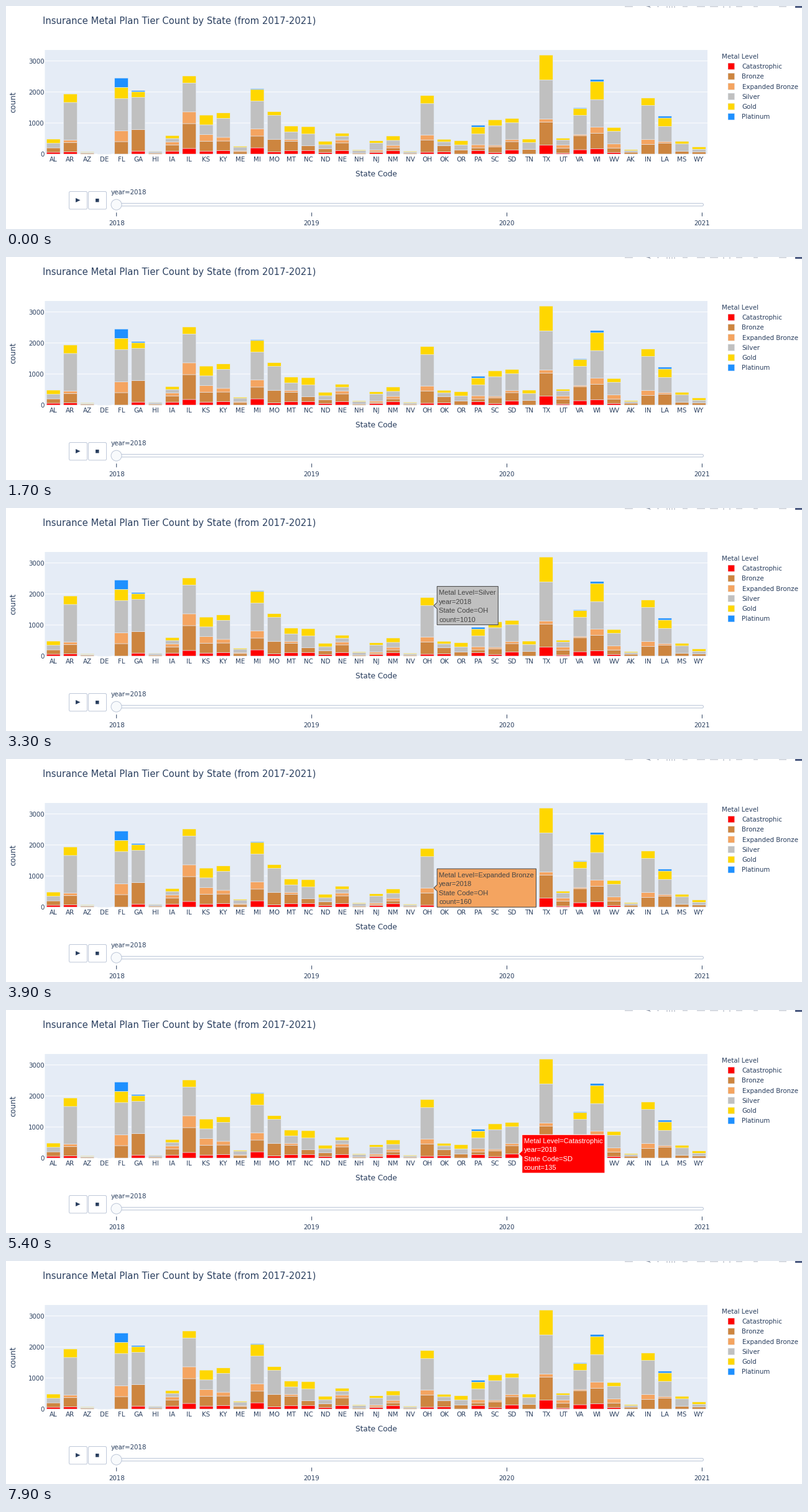
Recreate the animation shown at these times as a matplotlib script. Size 1280 by 360 pixels, loop 8000 ms.

```python
import matplotlib.pyplot as plt
from matplotlib.animation import FuncAnimation
from matplotlib.patches import Circle, FancyBboxPatch, Polygon, Rectangle

W, H, DPI = 1280, 360, 100
INK, PLOT_BG, CONTROL, SLIVER = "#2a3f5f", "#e5ecf6", "#bec8d9", "#d3d7de"
PX = 72 / DPI  # points per pixel

STATES = ("AL AR AZ DE FL GA HI IA IL KS KY ME MI MO MT NC ND NE NH NJ NM NV OH "
          "OK OR PA SC SD TN TX UT VA WI WV AK IN LA MS WY").split()
COLORS = {
    "Catastrophic": "#ff0000",
    "Bronze": "#cd853f",
    "Expanded Bronze": "#f4a460",
    "Silver": "#c0c0c0",
    "Gold": "#ffd700",
    "Platinum": "#1e90ff",
}
LEFT, RIGHT, TOP, BASE = 62.5, 1128, 71, 239
STEP = (RIGHT - LEFT) / len(STATES)

plt.rcParams["path.snap"] = False  # keep soft sub-pixel edges
fig = plt.figure(figsize=(W / DPI, H / DPI), dpi=DPI, facecolor="white")
ax = fig.add_axes([0, 0, 1, 1])
ax.set_xlim(0, W)
ax.set_ylim(H, 0)
ax.axis("off")


def label(x, y, s, size=10.2, ha="left", color=INK, font="DejaVu Sans", **kw):
    """Text whose capitals are centred vertically on y."""
    return ax.text(x, y + 0.365 * size, s, fontsize=size * PX, ha=ha,
                   va="baseline", color=color, family=font, **kw)


def rect(x0, y0, x1, y1, color, edge="none", lw=0.0):
    ax.add_patch(Rectangle((x0, y0), x1 - x0, y1 - y0, facecolor=color,
                           edgecolor=edge, linewidth=lw * PX))


def rounded(x0, y0, x1, y1, radius, color):
    ax.add_patch(FancyBboxPatch(
        (x0, y0), x1 - x0, y1 - y0, facecolor=color, edgecolor=CONTROL,
        boxstyle=f"round,pad=0,rounding_size={radius}", linewidth=PX))


def state_x(state):
    return LEFT + (STATES.index(state) + 0.5) * STEP


def count_y(value):
    return BASE - value * 0.0501


totals = dict.fromkeys(STATES, 0)
spans = {}


def stack(tier, **tops):
    """Add one tier on top of the bars, up to its running total per state."""
    for state, top in tops.items():
        x, bottom = state_x(state), totals[state]
        rect(x - 0.4 * STEP, count_y(top), x + 0.4 * STEP, count_y(bottom),
             COLORS[tier], PLOT_BG, 0.6)
        spans[tier, state] = bottom, top
        totals[state] = top


# Plot area
rect(LEFT, TOP, RIGHT, BASE, PLOT_BG)
for value in range(0, 4000, 1000):
    y = count_y(value)
    rect(LEFT, y - 0.5, RIGHT, y + 0.5, "white")
    label(62, y + 0.6, str(value), ha="right")

stack("Catastrophic", AL=60, AR=70, GA=95, IA=95, IL=180, KS=95, KY=115, MI=200,
      MO=70, MT=105, NC=115, ND=50, NE=115, NJ=50, NM=105, OH=60, OK=70, PA=110,
      SC=45, SD=135, TX=285, UT=30, VA=140, WI=175, WV=50)
stack("Bronze", AL=200, AR=370, AZ=25, FL=400, GA=790, HI=30, IA=295, IL=980,
      KS=415, KY=420, ME=80, MI=580, MO=475, MT=415, NC=265, ND=170, NE=360,
      NH=30, NJ=80, NM=200, NV=25, OH=455, OK=265, OR=130, PA=200, SC=235,
      SD=400, TN=145, TX=1025, UT=190, VA=595, WI=670, WV=195, AK=60, IN=310,
      LA=345, MS=85, WY=65)
stack("Expanded Bronze", AR=450, FL=745, IA=390, IL=1360, KS=625, KY=540,
      ME=105, MI=815, MT=475, NE=455, NJ=130, NM=280, OH=615, PA=300, SC=280,
      SD=465, TX=1130, UT=290, VA=630, WI=865, WV=325, IN=470, LA=400)
stack("Silver", AL=345, AR=1660, AZ=55, DE=10, FL=1785, GA=1825, HI=80, IA=500,
      IL=2290, KS=940, KY=1150, ME=220, MI=1705, MO=1245, MT=715, NC=645,
      ND=300, NE=575, NH=110, NJ=355, NM=440, NV=65, OH=1625, OK=395, OR=295,
      PA=650, SC=915, SD=1010, TN=370, TX=2390, UT=450, VA=1245, WI=1755,
      WV=735, AK=110, IN=1565, LA=890, MS=325, WY=155)
stack("Gold", AL=480, AR=1935, AZ=70, DE=14, FL=2150, GA=2010, HI=95, IA=595,
      IL=2515, KS=1255, KY=1325, ME=250, MI=2080, MO=1365, MT=900, NC=880,
      ND=410, NE=670, NH=135, NJ=425, NM=580, NV=90, OH=1885, OK=475, OR=430,
      PA=870, SC=1100, SD=1145, TN=480, TX=3190, UT=510, VA=1465, WI=2335,
      WV=855, AK=140, IN=1805, LA=1160, MS=410, WY=230)
stack("Platinum", FL=2450, GA=2045, MI=2105, PA=925, VA=1490, WI=2400, LA=1220)

for state in STATES:
    label(state_x(state), 246.8, state, ha="center")

# Titles and legend
label(59, 23.6, "Insurance Metal Plan Tier Count by State (from 2017-2021)", 14.8)
label(595.5, 270.3, "State Code", 12.1, ha="center")
ax.text(15, 154.5, "count", fontsize=12.1 * PX, color=INK, rotation=90,
        rotation_mode="anchor", ha="center", va="baseline", family="DejaVu Sans")
label(1151, 81, "Metal Level")
for i, (tier, color) in enumerate(COLORS.items()):
    y = 97.4 + 16.25 * i
    rect(1161, y - 5.3, 1171.6, y + 5.3, color, PLOT_BG, 0.5)
    label(1183.5, y, tier)

# Toolbar slivers cut off by the top edge
for x0, x1 in [(995, 1008), (1047, 1050), (1088, 1096), (1111, 1124),
               (1132, 1145), (1174, 1184), (1202, 1209), (1243, 1255)]:
    rect(x0, 0, x1, 1.8, SLIVER)
for x in (*range(1062, 1078, 4), 1153, 1163):
    rect(x, 0, x + 2, 3, SLIVER)
ax.add_patch(Polygon([(1029, 0), (1035, 0), (1037, 3)], color="#9aa3b2", lw=0))
rect(1269, 0, 1280, 3, "#4b5a80")

# Playback controls
rounded(101.5, 299.5, 130.5, 328, 2, "white")
rounded(132.5, 299.5, 161.5, 328, 2, "white")
ax.add_patch(Polygon([(112, 310), (119.5, 313.5), (112, 317)], color=INK, lw=0))
rect(144, 311, 149.5, 316.5, INK)
label(169, 300.5, "year=2018")
rounded(171.5, 318.5, 1121.5, 323, 2.2, "#f8fafc")
ax.add_patch(Circle((177.5, 320.7), 8.5, facecolor="#f8fafc",
                    edgecolor=CONTROL, linewidth=PX))
for i in range(4):
    x = 177.7 + 313.9 * i
    rect(x - 0.5, 333.5, x + 0.5, 339.5, INK)
    label(x, 350, str(2018 + i), ha="center")


def tooltip(tier, state):
    """Build the hover label for one bar segment."""
    bottom, top = spans[tier, state]
    lines = [f"Metal Level={tier}", "year=2018", f"State Code={state}",
             f"count={top - bottom}"]
    ink = "white" if tier == "Catastrophic" else "#444444"
    tip, y = state_x(state) + 10.7, count_y(top)
    left = tip + 5.3
    texts = [label(left + 3, y + 0.3 + 14.45 * (i - 1.5), s, 11.1, color=ink,
                   font="Liberation Sans", zorder=6)
             for i, s in enumerate(lines)]
    right = left + 6.5 + max(t.get_window_extent().width for t in texts)
    box = Polygon([(tip, y), (left, y - 5), (left, y - 31), (right, y - 31),
                   (right, y + 31), (left, y + 31), (left, y + 5)],
                  facecolor=COLORS[tier], edgecolor=ink, linewidth=PX, zorder=5)
    ax.add_patch(box)
    return [box, *texts]


# Hover steps: first and last tick (100 ms each), then the hovered segment
HOVERS = [(start, end, tooltip(tier, state)) for start, end, tier, state in [
    (22, 29, "Gold", "OH"),
    (30, 34, "Silver", "OH"),
    (35, 41, "Expanded Bronze", "OH"),
    (42, 46, "Bronze", "OH"),
    (47, 50, "Catastrophic", "OH"),
    (51, 57, "Catastrophic", "SD"),
]]


def update(tick):
    for start, end, artists in HOVERS:
        for artist in artists:
            artist.set_visible(start <= tick <= end)
    return [artist for _, _, artists in HOVERS for artist in artists]


anim = FuncAnimation(fig, update, frames=80, interval=100, repeat=True,
                     repeat_delay=0, blit=False)
plt.show()
```
